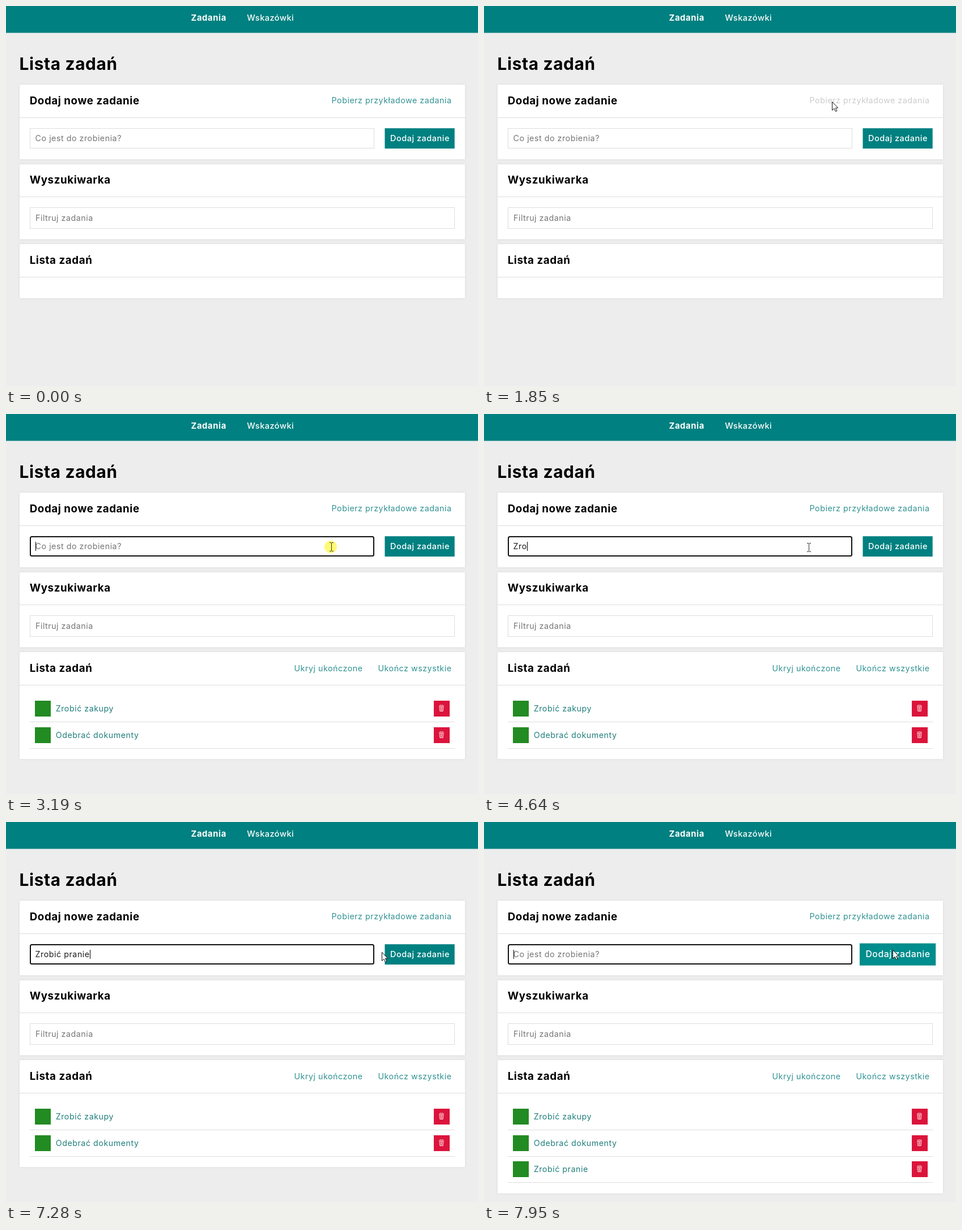
Write an HTML page with a canvas that moves like this. It is 833x672 px and loops after 8000 ms.

```html
<!DOCTYPE html>
<html lang="pl">
<head>
<meta charset="utf-8">
<title>Lista zadań</title>
<style>
  html, body { margin: 0; width: 100%; height: 100%; overflow: hidden; background: #ededed; }
  canvas { display: block; }
</style>
</head>
<body>
<canvas id="stage" width="833" height="672"></canvas>
<script>
const ctx = document.getElementById('stage').getContext('2d');
const LOOP = 8000;
const FAMILY = 'Montserrat, Inter, "Open Sans", sans-serif';
const TEAL = '#008080', LINE = '#dddddd', LINK = [50, 146, 146];

const STYLES = {
  h1: { font: `700 29.8px ${FAMILY}`, gap: 0.65 },
  h2: { font: `700 18.8px ${FAMILY}`, gap: 0.55 },
  strong: { font: `700 14.8px ${FAMILY}`, gap: 0.6 },
  label: { font: `500 14.5px ${FAMILY}`, gap: 0.5 },
  body: { font: `400 14.3px ${FAMILY}`, gap: 0.5 }
};

// Mouse path: time, x, y, ease-out power towards this point
const PATH = [
  [120, 752, 650, 1],
  [920, 603, 292, 1],
  [1250, 611, 178, 1.6],
  [1480, 616, 170, 1],
  [1780, 615, 167, 1],
  [2050, 613, 175, 1],
  [2640, 613, 175, 1],
  [3050, 574, 235, 1.3],
  [3190, 574, 235, 1],
  [3500, 573, 236, 1],
  [6950, 573, 236, 1],
  [7530, 722, 226, 1.1],
  [8000, 721, 226, 1]
];
const CLICKS = [[1500, 1760], [3170, 3490], [7500, 7730]];

const TASK = 'Zrobić pranie';
const KEYS = [4110, 4440, 4640, 4970, 5100, 5490, 5630, 5690, 5890, 6090, 6180, 6270, 6350];
const FETCH = 1650, LOADED = 2580, FOCUS = 3190, BLUR = 7500, ADDED = 7690;

const clamp = v => Math.max(0, Math.min(1, v));
const easeOut = (u, p) => 1 - Math.pow(1 - clamp(u), p);
const progress = (t, a, b) => clamp((t - a) / (b - a));

function mix(a, b, u) {
  return `rgb(${a.map((v, i) => Math.round(v + (b[i] - v) * u)).join(',')})`;
}

function box(x, y, w, h, color) {
  ctx.fillStyle = color;
  ctx.fillRect(x, y, w, h);
}

function frame(x, y, w, h) {
  ctx.strokeStyle = LINE;
  ctx.lineWidth = 1;
  ctx.strokeRect(x + 0.5, y + 0.5, w - 1, h - 1);
}

function setStyle(name) {
  ctx.font = STYLES[name].font;
  ctx.letterSpacing = STYLES[name].gap + 'px';
}

function text(str, x, y, style, color, align = 'left') {
  setStyle(style);
  ctx.textAlign = align;
  ctx.fillStyle = color;
  ctx.fillText(str, x, y);
}

function card(title, y, headY, bottom) {
  ctx.save();
  ctx.shadowColor = '#d8d8d8';
  ctx.shadowBlur = 4;
  box(24, y, 786, bottom - y, '#ffffff');
  ctx.restore();
  box(24, headY, 786, 1, LINE);
  text(title, 41.7, headY - 22.8, 'h2', '#000000');
}

function trashIcon(x, y) {
  ctx.strokeStyle = '#ffe3e0';
  ctx.lineWidth = 1;
  ctx.beginPath();
  ctx.ellipse(x, y - 4.3, 3.8, 1.2, 0, 0, Math.PI * 2);
  ctx.moveTo(x - 3.6, y - 3.5);
  ctx.lineTo(x - 2.7, y + 5);
  ctx.lineTo(x + 2.7, y + 5);
  ctx.lineTo(x + 3.6, y - 3.5);
  ctx.moveTo(x - 1, y - 2.5);
  ctx.lineTo(x - 0.8, y + 4);
  ctx.moveTo(x + 1, y - 2.5);
  ctx.lineTo(x + 0.8, y + 4);
  ctx.stroke();
}

function taskRow(name, i) {
  const y = 507 + Math.round(i * 46.7);
  box(51, y, 28, 28, '#228b22');
  box(755, y, 28, 28, '#dc143c');
  trashIcon(768.5, y + 13.5);
  text(name, 87.7, y + 18.6, 'body', '#207f7c');
  box(42, y + 37, 750, 1, LINE);
}

function linkColor(t) {
  const grey = [204, 204, 204], hover = [50, 168, 168];
  if (t < FETCH) return mix(LINK, hover, progress(t, 1290, 1450));
  if (t < LOADED + 60) return mix(hover, grey, progress(t, FETCH, FETCH + 100));
  return mix(grey, LINK, progress(t, LOADED + 60, LOADED + 340));
}

function entry(t) {
  const typed = t < ADDED ? TASK.slice(0, KEYS.filter(k => k <= t).length) : '';
  const focused = t >= FOCUS && t < BLUR || t >= ADDED;
  if (focused) {
    ctx.strokeStyle = '#101010';
    ctx.lineWidth = 2;
    ctx.beginPath();
    ctx.roundRect(43, 217, 606, 34, 2.5);
    ctx.stroke();
  } else {
    frame(42, 216, 608, 36);
  }
  text(typed || 'Co jest do zrobienia?', 51.6, 238.7, 'body', typed ? '#1c1c1c' : '#757575');
  const blinkOff = t >= 3710 && t < KEYS[0];
  if (focused && !blinkOff) {
    setStyle('body');
    box(52 + Math.floor(ctx.measureText(typed).width), 226, 1, 16, '#000000');
  }
}

function addButton(t) {
  const u = easeOut(progress(t, 7370, 7920), 2);
  ctx.save();
  ctx.translate(730.1, 234);
  ctx.scale(1 + 0.09 * u, 1 + 0.09 * u);
  box(-61.6, -17.8, 123.2, 35.9, mix([0, 128, 128], [0, 141, 141], u));
  text('Dodaj zadanie', 0.4, 4.7, 'label', '#ffffff', 'center');
  ctx.restore();
}

function mouseAt(t) {
  const i = PATH.findIndex(p => p[0] > t);
  const a = PATH[i - 1], b = PATH[i];
  const u = easeOut((t - a[0]) / (b[0] - a[0]), b[3]);
  return [a[1] + (b[1] - a[1]) * u, a[2] + (b[2] - a[2]) * u];
}

function arrow(x, y) {
  const pts = [[0, 0], [0, 15], [3.5, 11.7], [6, 17], [8.4, 16], [6, 10.8], [10.2, 10.6]];
  x = Math.round(x) + 0.5;
  y = Math.round(y) + 0.5;
  ctx.beginPath();
  pts.forEach(([dx, dy]) => ctx.lineTo(x + dx, y + dy));
  ctx.closePath();
  ctx.fillStyle = '#ffffff';
  ctx.fill();
  ctx.strokeStyle = '#111111';
  ctx.lineWidth = 1;
  ctx.stroke();
}

function beam(x, y) {
  x = Math.round(x);
  y = Math.round(y);
  const dark = '#333333';
  box(x - 3, y - 8, 3, 1, dark);
  box(x + 1, y - 8, 3, 1, dark);
  box(x, y - 7, 1, 14, dark);
  box(x - 3, y + 7, 3, 1, dark);
  box(x + 1, y + 7, 3, 1, dark);
}

function mouse(t) {
  if (t < PATH[0][0]) return;
  const [x, y] = mouseAt(t);
  if (CLICKS.some(([a, b]) => t >= a && t < b)) {
    ctx.fillStyle = 'rgba(255,245,0,0.55)';
    ctx.beginPath();
    ctx.arc(x - 1, y, 11, 0, Math.PI * 2);
    ctx.fill();
  }
  const inEntry = x < 650 && y > 216 && y < 253;
  const inFilter = x < 792 && y > 357 && y < 394;
  (inEntry || inFilter ? beam : arrow)(x, y);
}

function draw(t) {
  box(0, 0, 833, 672, '#ededed');
  box(0, 0, 833, 47.5, TEAL);
  text('Zadania', 326.5, 25.7, 'strong', '#ffffff');
  text('Wskazówki', 425.3, 25.7, 'label', '#ffffff');
  text('Lista zadań', 23.5, 112.5, 'h1', '#000000');

  const tasks = t < LOADED ? [] : ['Zrobić zakupy', 'Odebrać dokumenty'];
  if (t >= ADDED) tasks.push(TASK);

  card('Dodaj nowe zadanie', 139, 197, 271);
  text('Pobierz przykładowe zadania', 786.5, 172, 'body', linkColor(t), 'right');
  entry(t);
  addButton(t);

  card('Wyszukiwarka', 280, 337, 412.5);
  frame(42, 356, 750, 38);
  text('Filtruj zadania', 52, 379.7, 'body', '#757575');

  card('Lista zadań', 421, 479, 516.7 + 46.7 * tasks.length);
  if (tasks.length) {
    text('Ukryj ukończone', 629.5, 454.7, 'body', linkColor(0), 'right');
    text('Ukończ wszystkie', 786.5, 454.7, 'body', linkColor(0), 'right');
  }
  tasks.forEach(taskRow);
  mouse(t);
}

const start = performance.now();
function tick() {
  draw((performance.now() - start) % LOOP);
  requestAnimationFrame(tick);
}
tick();
</script>
</body>
</html>
```
